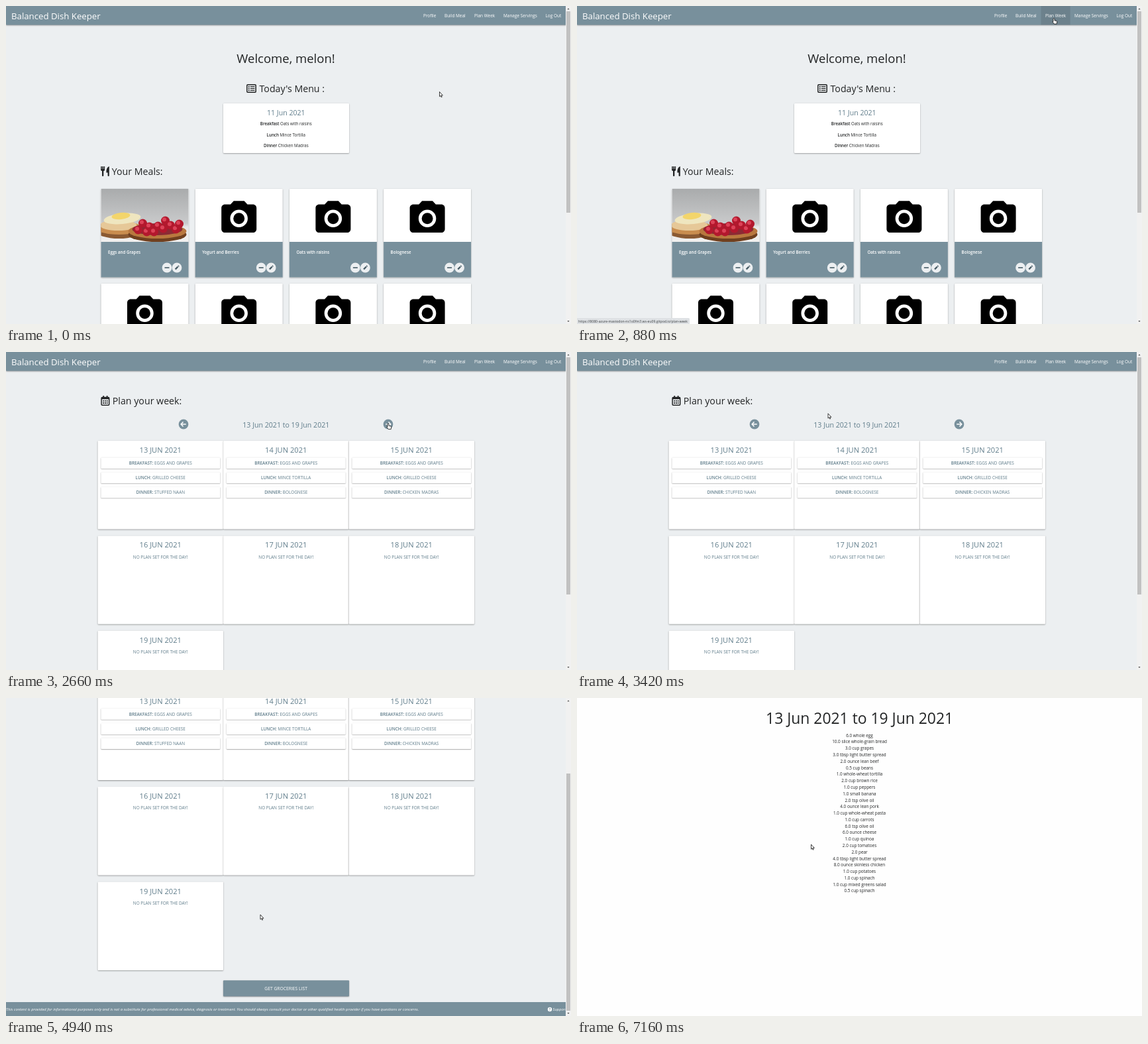
An HTML page with a canvas that plays this animation: 853x480 px, repeating every 7.22 s.

```html
<!DOCTYPE html>
<html lang="en">
<head>
<meta charset="utf-8">
<title>Weekly meals</title>
<style>
html, body { margin: 0; width: 100%; height: 100%; overflow: hidden; background: #eceff1; }
canvas { display: block; width: 853px; height: 480px; }
</style>
</head>
<body>
<canvas id="stage" width="853" height="480"></canvas>
<script>
const c = document.getElementById('stage').getContext('2d');
const LOOP = 7220, STEP = 95;
const BLUE = '#78909c', SLATE = '#607d8b', INK = '#222425', PAGE = '#eceff1';
const TO_WEEK = 1200, TO_NEXT = 2640, TO_LIST = 6210, PRESS = 5940;

// Pointer tip: time, x, y
const path = [
  [0, 654.5, 129.5], [760, 719, 18.5], [1250, 719, 18.5], [1710, 501.5, 102],
  [2150, 576, 108], [2800, 576, 108], [3400, 379, 91.5], [3850, 384, 327],
  [5050, 384, 327], [5600, 393, 436], [6330, 393, 436], [7125, 353.5, 221]
];

const links = [['Profile', 630], ['Build Meal', 662], ['Plan Week', 707], ['Manage Servings', 751], ['Log Out', 814.5]];
const url = 'https://8080-azure-mastodon-ns1o0fm3.ws-eu09.gitpod.io/plan-week';
const dishes = {
  E: 'EGGS AND GRAPES', Y: 'YOGURT AND BERRIES', O: 'OATS WITH RAISINS',
  M: 'MINCE TORTILLA', G: 'GRILLED CHEESE',
  B: 'BOLOGNESE', S: 'STUFFED NAAN', C: 'CHICKEN MADRAS', F: 'FISH CAKES'
};
const weeks = [
  { first: 6, plans: ['EMB', 'YGS', 'OGC', 'YGF', 'EMF', 'OMC'] },
  { first: 13, plans: ['EGS', 'EMB', 'EGC'] }
];
const groceries = `6.0 whole egg|10.0 slice whole-grain bread|3.0 cup grapes|3.0 tbsp light butter spread
2.0 ounce lean beef|0.5 cup beans|1.0 whole-wheat tortilla|2.0 cup brown rice|1.0 cup peppers
1.0 small banana|2.0 tsp olive oil|4.0 ounce lean pork|1.0 cup whole-wheat pasta|1.0 cup carrots
6.0 tsp olive oil|6.0 ounce cheese|1.0 cup quinoa|2.0 cup tomatoes|2.0 pear
4.0 tbsp light butter spread|8.0 ounce skinless chicken|1.0 cup potatoes|1.0 cup spinach
1.0 cup mixed greens salad|0.5 cup spinach`.split(/[|\n]/);
const disclaimer = 'This content is provided for informational purposes only and is not a substitute for ' +
  'professional medical advice, diagnosis or treatment. You should always consult your doctor or other ' +
  'qualified health provider if you have questions or concerns.';
const camera = new Path2D('M9 2L7.17 4H4c-1.1 0-2 .9-2 2v12c0 1.1.9 2 2 2h16c1.1 0 2-.9 2-2V6c0-1.1-.9-2-2-2' +
  'h-3.17L15 2H9zm3 15c-2.76 0-5-2.24-5-5s2.24-5 5-5 5 2.24 5 5-2.24 5-5 5z');
const arrowShape = new Path2D('M0 0V7.2L1.6 5.8 2.7 8.2 3.7 7.8 2.7 5.4H4.9Z');
const handShape = new Path2D('M1 0Q2 0 2 1V3.4L5 4Q5.8 4.2 5.7 5.2L5.2 8.6H1.4L-1 5.6Q-1.2 4.6 0 5V1Q0 0 1 0Z');

const clamp = v => Math.max(0, Math.min(1, v));
const ease = v => (v = clamp(v), v * v * (3 - 2 * v));

function at(x, y, scale, draw) {
  c.save();
  c.translate(x, y);
  c.scale(scale, scale);
  draw();
  c.restore();
}

function box(x, y, w, h, fill, r = 0) {
  c.fillStyle = fill;
  c.beginPath();
  c.roundRect(x, y, w, h, r);
  c.fill();
}

function raised(x, y, w, h, fill, depth = 1) {
  c.save();
  c.shadowColor = 'rgba(0,0,0,.4)';
  c.shadowBlur = 2 * depth;
  c.shadowOffsetY = .8 * depth;
  box(x, y, w, h, fill, 1);
  c.restore();
}

function disc(x, y, r, fill) {
  c.fillStyle = fill;
  c.beginPath();
  c.arc(x, y, r, 0, 7);
  c.fill();
}

function oval(x, y, rx, ry, fill, turn = 0) {
  c.fillStyle = fill;
  c.beginPath();
  c.ellipse(x, y, rx, ry, turn, 0, 7);
  c.fill();
}

function line(color, width, ...p) {
  c.strokeStyle = color;
  c.lineWidth = width;
  c.beginPath();
  for (let i = 0; i < p.length; i += 2) c.lineTo(p[i], p[i + 1]);
  c.stroke();
}

const setFont = (size, style = '') => c.font = `${style} ${size}px "Open Sans", "Noto Sans", sans-serif`;

function text(s, x, y, size, color = INK, align = 'left', style = '') {
  setFont(size, style);
  c.fillStyle = color;
  c.textAlign = align;
  c.fillText(s, x, y);
}
const centred = (s, x, y, size, color, style) => text(s, x, y, size, color, 'center', style);

// A semibold label and its value, centred together
function pair(label, value, x, y, size, color) {
  setFont(size, 600);
  const a = c.measureText(label + ' ').width;
  setFont(size);
  const left = x - (a + c.measureText(value).width) / 2;
  text(label, left, y, size, color, 'left', 600);
  text(value, left + a, y, size, color);
}

function navBar(tip) {
  raised(0, -2, 846, 30.4, BLUE);
  text('Balanced Dish Keeper', 8, 20, 13.23, '#fff');
  for (const [name, x] of links) {
    setFont(6.45);
    const w = c.measureText(name).width;
    if (tip[1] < 28 && tip[0] > x - 6.5 && tip[0] < x + w + 6.5) box(x - 6.5, 0, w + 13, 28.4, 'rgba(0,0,0,.1)');
    text(name, x, 17, 6.45, '#fff');
  }
}

function scrollBar(y, h) {
  box(845, 0, 8, 480, '#f1f1f1');
  box(846, y, 6, h, '#c1c1c1');
  c.fillStyle = '#505050';
  c.fill(new Path2D('M847.4 5.2h3.2l-1.6-2zM847.4 475h3.2l-1.6 2z'));
}

function listIcon(x, y) {
  c.strokeStyle = INK;
  c.lineWidth = 1.5;
  c.beginPath();
  c.roundRect(x + .8, y + .8, 13.4, 11.4, 1.2);
  c.stroke();
  for (let i = 0; i < 3; i++) {
    disc(x + 3.7, y + 3.7 + i * 2.8, .95, INK);
    box(x + 5.8, y + 3.1 + i * 2.8, 6.6, 1.2, INK);
  }
}

function cutleryIcon(x, y) {
  for (let i = 0; i < 3; i++) box(x + i * 2.2, y, 1.5, 5.5, INK, .6);
  box(x, y + 4, 5.9, 3, INK, 1.4);
  box(x + 1.8, y + 5, 2.3, 10, INK, 1);
  c.fillStyle = INK;
  c.fill(new Path2D(`M${x + 12.6} ${y}v14q0 1-1.1 1t-1.1-1v-4.5h-2.2q-.3-8 4.4-9.5z`));
}

function calendarIcon(x, y) {
  c.strokeStyle = INK;
  c.lineWidth = 1.5;
  c.beginPath();
  c.roundRect(x + .8, y + 2.5, 11.6, 11.7, 1.2);
  c.stroke();
  box(x + .8, y + 2.5, 11.6, 2.8, INK);
  box(x + 3, y, 1.8, 4, INK, .5);
  box(x + 8.4, y, 1.8, 4, INK, .5);
  for (let i = 0; i < 6; i++) box(x + 2.9 + i % 3 * 2.8, y + 7 + (i > 2) * 3.1, 1.8, 1.8, INK);
}

function toast() {
  c.save();
  c.beginPath();
  c.rect(0, 0, 132, 80);
  c.clip();
  const g = c.createLinearGradient(0, 0, 0, 80);
  g.addColorStop(0, '#a9abac');
  g.addColorStop(.65, '#c9cacb');
  g.addColorStop(.72, '#e6e6e6');
  g.addColorStop(1, '#f1f0ef');
  box(0, 0, 132, 80, g);
  oval(27, 64, 34, 11, '#8a5a33');
  oval(27, 59, 35, 10, '#c98d4f');
  oval(26, 55, 28, 8, '#e6c898');
  oval(32, 45, 28, 8, '#efe6bf', -.1);
  oval(30, 41, 14, 5, '#f3d56b', -.1);
  oval(85, 69, 44, 11, '#70401f');
  oval(85, 64, 44, 11, '#b9783f');
  oval(85, 61, 38, 9, '#8c2a34');
  const berries = [[56, 62], [63, 52], [69, 65], [73, 57], [80, 65], [86, 56], [97, 48], [94, 60], [105, 55], [113, 61], [118, 53]];
  for (const [x, y] of berries) {
    disc(x, y, 6.5, '#b3182d');
    disc(x - 1.5, y - 1.8, 3, '#dc4358');
  }
  c.restore();
}

function mealCard(x, y, name) {
  raised(x, y, 132, 133.5, '#fff');
  if (name === 'Eggs and Grapes') at(x, y, 1, toast);
  else at(x + 34.2, y + 13, 2.65, () => {
    c.fillStyle = '#000';
    c.fill(camera);
    disc(12, 12, 3.2, '#000');
  });
  box(x, y + 80, 132, 53.5, BLUE);
  if (!name) return;
  text(name, x + 10.5, y + 98, 6.2, '#fff', 'left', 600);
  const by = y + 119;
  disc(x + 99.5, by, 7.4, PAGE);
  disc(x + 114.5, by, 7.4, PAGE);
  box(x + 96, by - .8, 7, 1.6, '#455a64');
  line('#455a64', 2.3, x + 112.2, by + 2.4, x + 116, by - 1.5);
  line('#455a64', 2.3, x + 116.5, by - 2, x + 117.4, by - 2.9);
}

function homePage(tip) {
  centred('Welcome, melon!', 422.5, 85.5, 18.5);
  listIcon(363, 118);
  text("Today's Menu :", 382.5, 130, 14.2);
  raised(328, 147, 190, 75, '#fff');
  centred('11 Jun 2021', 422.8, 164.8, 10.57, SLATE);
  pair('Breakfast', 'Oats with raisins', 422.8, 180.3, 6.2, INK);
  pair('Lunch', 'Mince Tortilla', 422.8, 196.8, 6.2, INK);
  pair('Dinner', 'Chicken Madras', 422.8, 213.2, 6.2, INK);
  cutleryIcon(143.2, 242);
  text('Your Meals:', 159.8, 255, 14.2);
  ['Eggs and Grapes', 'Yogurt and Berries', 'Oats with raisins', 'Bolognese'].forEach((name, i) => {
    mealCard(143.5 + i * 142.2, 276, name);
    mealCard(143.5 + i * 142.2, 419, '');
  });
  navBar(tip);
  scrollBar(8, 304);
  if (tip[1] < 28) {
    box(0, 471, 170, 9, '#dee1e4', [0, 1.5, 0, 0]);
    text(url, 2, 477.6, 5.1, '#3c4043');
  }
}

function arrowButton(x, dir) {
  disc(x, 109, 7.4, BLUE);
  line('#fff', 1.5, x - 3.8 * dir, 109, x + 3.4 * dir, 109);
  line('#fff', 1.5, x + .5 * dir, 105.6, x + 3.8 * dir, 109, x + .5 * dir, 112.4);
}

function dayCard(x, y, day, plan) {
  const mid = x + 94.6;
  raised(x, y, 189.4, 133.4, '#fff');
  centred(`${day} JUN 2021`, mid, y + 18, 11.1, SLATE);
  if (!plan) return centred('NO PLAN SET FOR THE DAY!', mid, y + 34.2, 6.45, SLATE);
  ['BREAKFAST:', 'LUNCH:', 'DINNER:'].forEach((meal, i) => {
    const top = y + 25.2 + i * 22.2;
    raised(x + 4.7, top, 180, 16.8, '#fff', .7);
    pair(meal, dishes[plan[i]], mid, top + 10.7, 6.4, SLATE);
  });
}

function groceryButton(t) {
  raised(328, 569.5, 190, 24, BLUE);
  const p = clamp((t - PRESS) / 500);
  if (p > 0) {
    c.save();
    c.beginPath();
    c.rect(328, 569.5, 190, 24);
    c.clip();
    disc(394, 582, 200 * (1 - (1 - p) ** 1.7), 'rgba(255,255,255,.14)');
    c.restore();
  }
  centred('GET GROCERIES LIST', 422.6, 584, 6.75, '#fff');
}

function weekPage(t, tip, { first, plans }) {
  const scroll = 143.3 * ease((t - 3950) / 600);
  const date = n => String(first + n).padStart(2, '0');
  c.save();
  c.translate(0, -scroll);
  calendarIcon(143.3, 66);
  text('Plan your week:', 160.8, 78.6, 14.2);
  arrowButton(268, -1);
  arrowButton(577, 1);
  centred(`${date(0)} Jun 2021 to ${date(6)} Jun 2021`, 422.8, 113.6, 10.6, SLATE);
  for (let i = 0; i < 7; i++) dayCard(138.6 + i % 3 * 189.5, 134 + Math.floor(i / 3) * 143.4, date(i), plans[i]);
  groceryButton(t);
  box(0, 602.3, 846, 22, BLUE);
  text(disclaimer, 0, 615.3, 5.85, '#fff', 'left', 'italic');
  disc(821, 613.3, 3.2, '#fff');
  centred('?', 821, 615.4, 5.4, BLUE, 700);
  text('Support', 825.5, 615.3, 5.85, '#fff', 'left', 'italic');
  navBar([tip[0], tip[1] + scroll]);
  c.restore();
  scrollBar(8 + scroll * .74, 358);
}

function groceryPage() {
  box(0, 0, 853, 480, '#fefefe');
  centred('13 Jun 2021 to 19 Jun 2021', 426.6, 38.6, 22.9);
  groceries.forEach((item, i) => centred(item, 426.5, 58.7 + i * 9.78, 6.37));
}

function pointer(t) {
  const i = path.findIndex((p, n) => n && t < p[0]);
  if (i < 0) return path.at(-1).slice(1);
  const [a, b] = [path[i - 1], path[i]];
  const k = ease((t - a[0]) / (b[0] - a[0]));
  return [a[1] + (b[1] - a[1]) * k, a[2] + (b[2] - a[2]) * k];
}

function drawPointer(t, [x, y]) {
  const onLink = t < TO_WEEK && y < 28;
  const onArrow = t > TO_WEEK && t < 3000 && Math.hypot(x - 577, y - 109) < 7.4;
  const onButton = t > 5000 && t < TO_LIST && y > 426;
  at(x, y, 1, () => {
    const shape = onLink || onArrow || onButton ? handShape : arrowShape;
    c.fillStyle = '#fff';
    c.strokeStyle = '#111';
    c.lineWidth = .8;
    c.fill(shape);
    c.stroke(shape);
  });
}

function frame() {
  const t = Math.floor(performance.now() % LOOP / STEP) * STEP;
  const tip = pointer(t);
  box(0, 0, 853, 480, PAGE);
  if (t < TO_WEEK) homePage(tip);
  else if (t < TO_LIST - STEP / 2) weekPage(t, tip, weeks[t < TO_NEXT ? 0 : 1]);
  else groceryPage();
  drawPointer(t, tip);
  requestAnimationFrame(frame);
}
frame();
</script>
</body>
</html>
```
